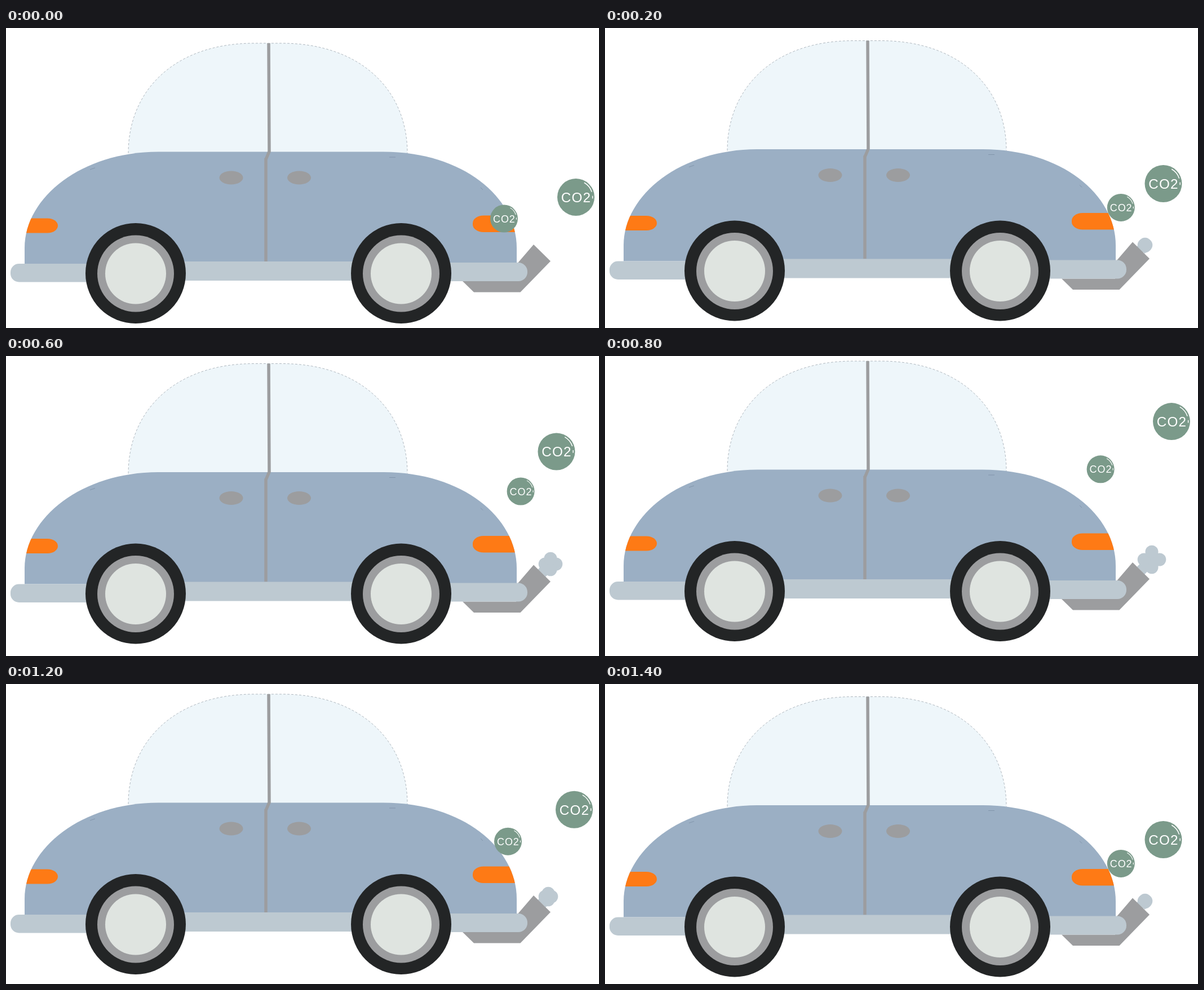
These frames come from a looping animation (1052x532 px, 1.6 s). An HTML page with a canvas:

```html
<!DOCTYPE html>
<html lang="en">
<head>
<meta charset="utf-8">
<title>Car exhaust</title>
<style>
  html, body { margin: 0; width: 100%; height: 100%; overflow: hidden; background: #fff; }
  canvas { display: block; }
</style>
</head>
<body>
<canvas id="stage" width="1052" height="532"></canvas>
<script>
const ctx = document.getElementById('stage').getContext('2d');
const STEP = 200, STEPS = 8, LIFT = 4.5;
const GREY = '#9c9d9f', BLUE = '#9bafc4', PALE = '#bdc9d1', ORANGE = '#fe7a15';

const roof = 'M217 222C217 110 300 27 440 27H489C629 27 712 110 712 222';
const dome = new Path2D(roof + 'Z');
const domeEdge = new Path2D(roof);
const body = new Path2D('M33 418V390C33 300 135 219.5 270 219.5H670C810 219.5 906 300 906 390V418Z');
const pipe = new Path2D('M810 449L830 468.5H912.5L966 413.5L936 384L905 420V449Z');
const scratches = new Path2D('M149 251L158 248M680 229H691M842 283L846 287');

function fill(path, color) {
  ctx.fillStyle = color;
  ctx.fill(path);
}

function oval(x, y, rx, ry, color) {
  ctx.fillStyle = color;
  ctx.beginPath();
  ctx.ellipse(x, y, rx, ry, 0, 0, Math.PI * 2);
  ctx.fill();
}

const disc = (x, y, r, color) => oval(x, y, r, r, color);

function bar(x, y, w, h, radii, color) {
  ctx.fillStyle = color;
  ctx.beginPath();
  ctx.roundRect(x, y, w, h, radii);
  ctx.fill();
}

function line(color, width, ...pts) {
  ctx.strokeStyle = color;
  ctx.lineWidth = width;
  ctx.beginPath();
  pts.forEach(([x, y]) => ctx.lineTo(x, y));
  ctx.stroke();
}

function wheel(x) {
  disc(x, 435, 89, '#232526');
  disc(x, 435.5, 68, GREY);
  disc(x, 435.5, 54, '#dfe4e0');
}

function lamps() {
  const round = { x: 19, y: 13.5 };
  ctx.save();
  ctx.clip(body);
  bar(20, 337.5, 72, 26, [0, round, round, 0], ORANGE);
  bar(828, 332.5, 90, 29.5, [round, 0, 0, round], ORANGE);
  ctx.restore();
}

function car() {
  fill(pipe, GREY);
  fill(dome, '#eef6fa');
  ctx.setLineDash([4, 3]);
  ctx.lineWidth = 0.8;
  ctx.strokeStyle = 'rgba(70,85,100,.5)';
  ctx.stroke(domeEdge);
  ctx.setLineDash([]);
  fill(body, BLUE);
  ctx.strokeStyle = '#7b8fa5';
  ctx.stroke(scratches);
  lamps();

  line(GREY, 5.5, [466, 27], [467, 219], [461, 233]);
  line(GREY, 5.5, [461, 231], [461, 414]);
  for (const x of [399.5, 520]) oval(x, 265.5, 21, 12, GREY);

  bar(8, 418, 150, 32.5, [15, 0, 0, 15], PALE);
  bar(300, 414, 330, 34, 0, PALE);
  bar(770, 416, 155, 33, [0, 16, 16, 0], PALE);
  wheel(230);
  wheel(701);
}

// A puff of four lobes that leaves the pipe and spreads as it rises.
function smoke(pose) {
  if (!pose) return;
  const x = 954 + 4 * pose, y = 393 - 8 * pose, spread = 4 * pose - 2.2;
  line(PALE, 19, [950.5, 398.5 - LIFT * pose], [x, y]);
  disc(x, y, 12, PALE);
  for (let i = 0; i < 4; i++) {
    const a = i * Math.PI / 2;
    disc(x + spread * Math.cos(a), y + spread * Math.sin(a), 11.5, PALE);
  }
}

function bubble(x, y, r) {
  disc(x, y, r, '#7b9a8a');
  ctx.strokeStyle = ctx.fillStyle = '#fff';
  ctx.lineWidth = r * 0.045;
  for (const [from, to] of [[-1.05, -0.32], [-0.08, 0.08]]) {
    ctx.beginPath();
    ctx.arc(x, y, r * 0.9, from, to);
    ctx.stroke();
  }
  const size = r * 0.735;
  ctx.font = `${size}px "Liberation Sans", Arial, sans-serif`;
  ctx.letterSpacing = `${size * 0.05}px`;
  ctx.textAlign = 'center';
  ctx.fillText('CO2', x + size * 0.02, y + size * 0.37);
}

// Both bubbles climb after a short delay and sway on every other pose.
function bubbles(pose) {
  const sway = pose % 2;
  const climb = delay => Math.max(0, pose - delay);
  bubble(883.5 + 8.1 * pose - 2.3 * pose ** 2 + 26 * sway, 338 - 39.2 * climb(0.5), 24.5);
  bubble(1011 - 1.5 * pose - sway * (13.5 + 5.5 * pose), 300 - 53.3 * climb(0.55), 33);
}

function draw(time) {
  const step = Math.floor(time / STEP) % STEPS;
  const pose = Math.min(step, STEPS - step);
  ctx.fillStyle = '#fff';
  ctx.fillRect(0, 0, 1052, 532);
  smoke(pose);
  ctx.save();
  ctx.translate(0, -LIFT * pose);
  car();
  ctx.restore();
  bubbles(pose);
}

let start;
function loop(now) {
  start ??= now;
  draw(Math.max(0, now - start));
  requestAnimationFrame(loop);
}
draw(0);
requestAnimationFrame(loop);
</script>
</body>
</html>
```
